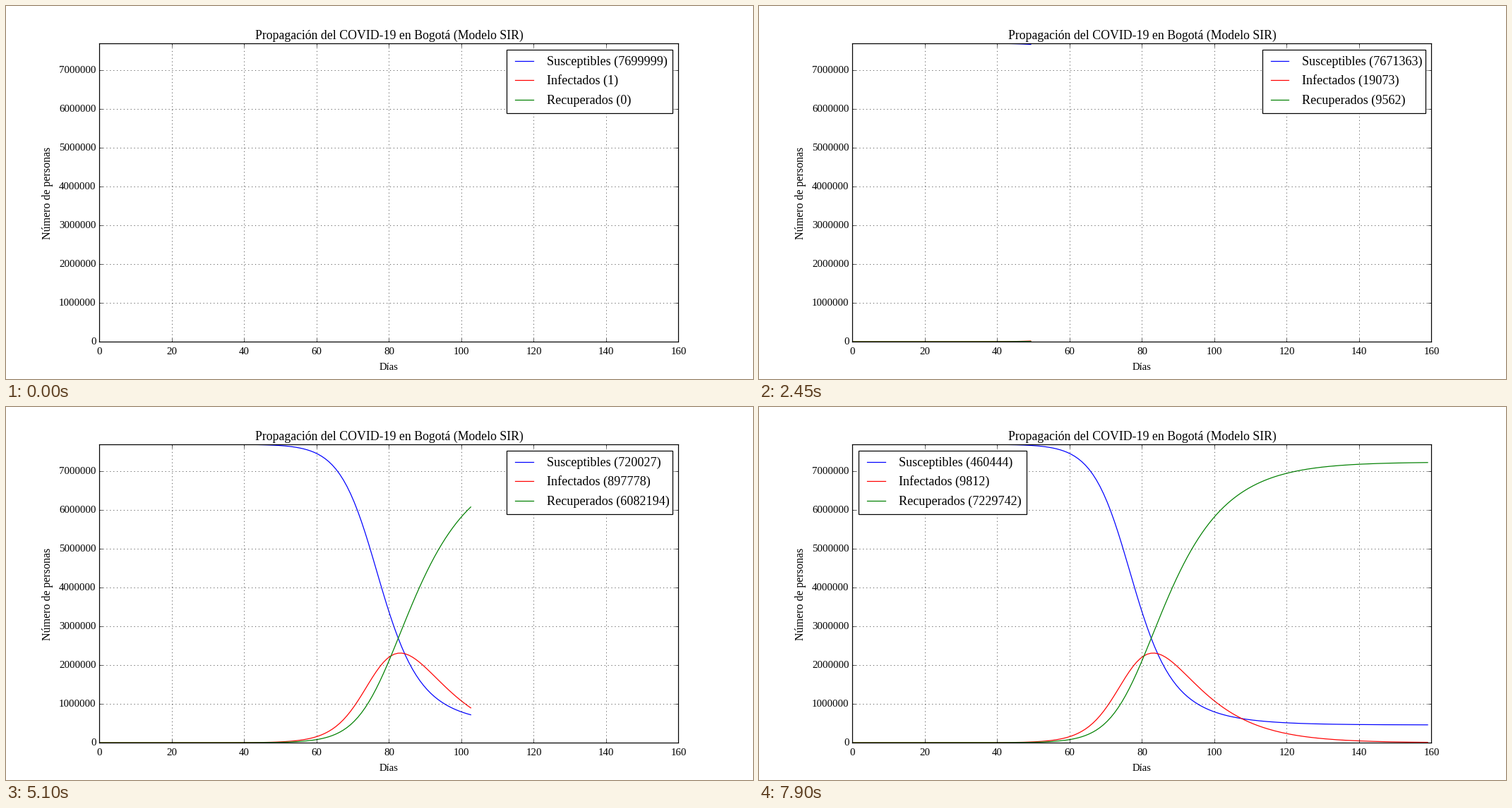
A matplotlib script for the animation above (7950 ms loop, 1058x529 px).

```python
import numpy as np
import matplotlib.pyplot as plt
from matplotlib.animation import FuncAnimation
from matplotlib.patches import Rectangle

plt.rcParams["font.family"] = "Liberation Serif"

W, H = 1058, 529
PEOPLE = 7_700_000
BETA, GAMMA = 0.3, 0.1
DAYS = 160
FRAMES = 159
MOVE_LEFT = 113  # the legend leaves the right corner when a curve reaches it


def rate(y):
    s, i, _ = y
    caught, healed = BETA * s * i / PEOPLE, GAMMA * i
    return np.array([-caught, caught - healed, healed])


def solve(times, sub=20):
    y = np.array([PEOPLE - 1.0, 1.0, 0.0])
    out = [y]
    h = (times[1] - times[0]) / sub
    for _ in times[1:]:
        for _ in range(sub):
            a = rate(y)
            b = rate(y + h / 2 * a)
            c = rate(y + h / 2 * b)
            d = rate(y + h * c)
            y = y + h / 6 * (a + 2 * b + 2 * c + d)
        out.append(y)
    return np.array(out)


days = np.linspace(0, DAYS, 160)
data = solve(days)

fig = plt.figure(figsize=(12, 6), dpi=W / 12, facecolor="white")

# Plot area
ax = fig.add_axes([0.125, 0.1, 0.775, 0.8])
ax.set_xlim(0, DAYS)
ax.set_ylim(0, PEOPLE)
x_ticks = range(0, DAYS + 1, 20)
y_ticks = range(0, PEOPLE, 1_000_000)
ax.set_xticks(x_ticks)
ax.set_yticks(y_ticks)
ax.tick_params(direction="in", length=4, width=0.5, top=True, right=True,
               labelbottom=False, labelleft=False)
ax.set_axisbelow(False)
ax.grid(True, color="black", linewidth=0.5, linestyle=(0, (2, 6)))
for spine in ax.spines.values():
    spine.set_linewidth(1)

# Overlay in pixels, y downwards
top = fig.add_axes([0, 0, 1, 1])
top.set_xlim(0, W)
top.set_ylim(H, 0)
top.axis("off")


def label(x, y, text, size, ha="center", **kw):
    return top.text(x, y, text, fontsize=size, ha=ha, va="baseline", **kw)


label(542.5, 46.5, "Propagación del COVID-19 en Bogotá (Modelo SIR)", 14.5)
label(542.5, 515.5, "Días", 12)
label(63, 265, "Número de personas", 13.1, rotation=90, rotation_mode="anchor")
for v in x_ticks:
    label(132.5 + 820 * v / DAYS, 493.5, str(v), 12.2)
for v in y_ticks:
    label(127.5, 480.2 - 423.2 * v / PEOPLE, str(v), 12.2, ha="right")

# Curves and legend
NAMES = ["Susceptibles", "Infectados", "Recuperados"]
COLORS = ["#0000ff", "#ff0000", "#008000"]
ROWS = [78, 105, 133]
curves = [ax.plot([], [], color=c, lw=1)[0] for c in COLORS]
box = top.add_patch(Rectangle((707, 62), 237, 89.5, fc="white", ec="black",
                              lw=1, zorder=5))
handles = [top.plot([], [], color=c, lw=1, zorder=6)[0] for c in COLORS]
entries = [label(0, y + 6, "", 14.8, ha="left", zorder=6) for y in ROWS]


def text_width(entry):
    ones = entry.get_text().count("1")
    return entry.get_window_extent().width - min(3 * ones, 5)


def draw(k):
    for j, name in enumerate(NAMES):
        curves[j].set_data(days[:k + 1], data[:k + 1, j])
        entries[j].set_text(f"{name} ({int(data[k, j])})")
    width = 64 + max(text_width(e) for e in entries)
    left = 141 if k >= MOVE_LEFT else 944 - width
    box.set_x(left)
    box.set_width(width)
    for handle, entry, y in zip(handles, entries, ROWS):
        handle.set_data([left + 12, left + 37.5], [y, y])
        entry.set_x(left + 56.5)
    return curves + handles + entries + [box]


anim = FuncAnimation(fig, draw, frames=FRAMES, init_func=lambda: draw(0),
                     interval=50, repeat=True, repeat_delay=0)
plt.show()
```
